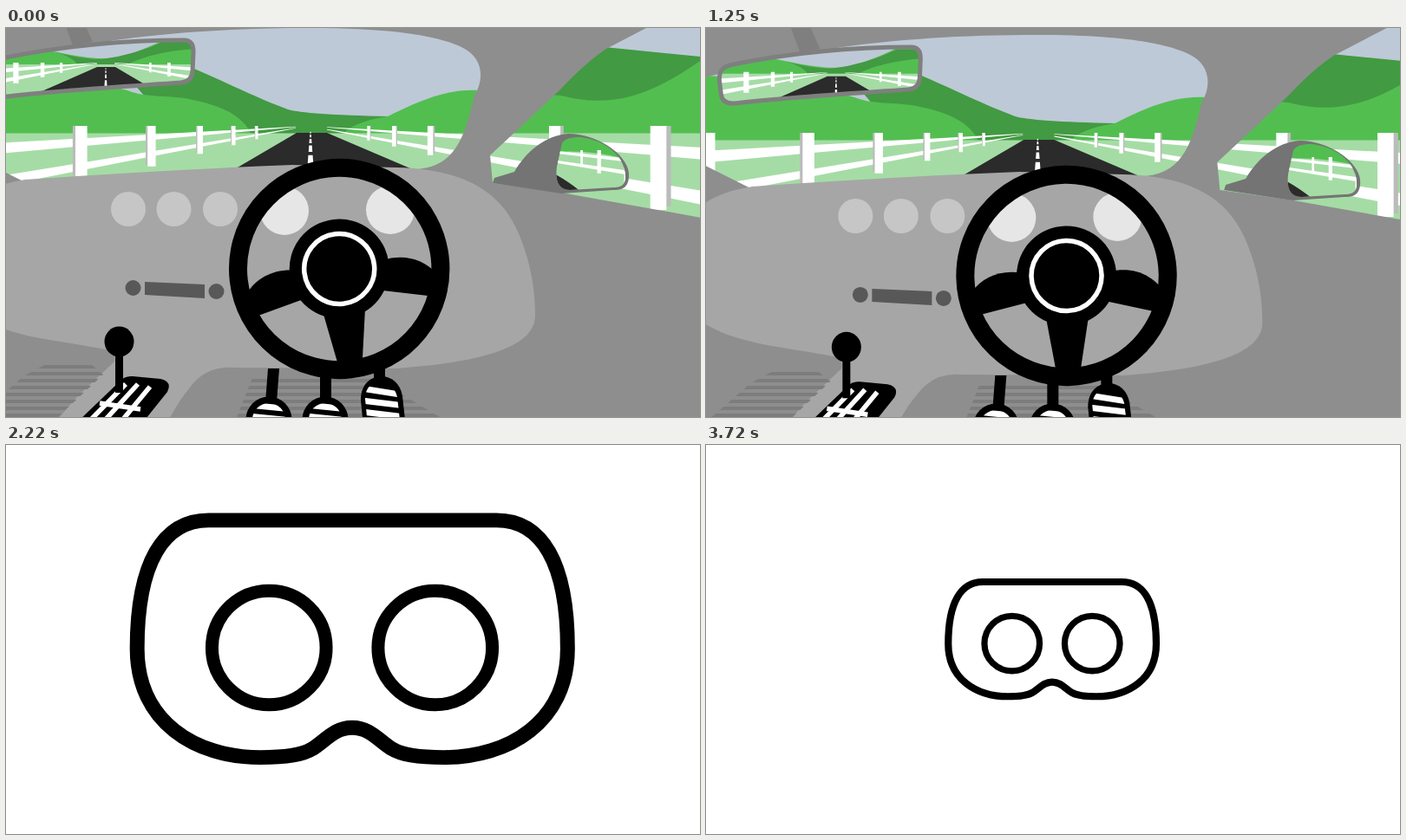
These frames come from a looping animation (800x449 px, 3770 ms). An HTML page:

```html
<!DOCTYPE html>
<html lang="en">
<head>
<meta charset="utf-8">
<title>Driving view to headset</title>
<style>
  html, body { margin: 0; height: 100%; overflow: hidden; background: #fff; }
  svg { display: block; width: 100vw; height: 100vh; }
  .sky { fill: #bdc9d6; }
  .dark { fill: #429a42; }
  .light { fill: #52be50; }
  .field { fill: #a5dca5; }
  .road { fill: #2b2b2b; }
  .white { fill: #fff; }
  .shade { fill: #bbb; }
  .cabin { fill: #8e8e8e; }
  .dash { fill: #a6a6a6; }
  .line { fill: none; stroke: #000; }
</style>
</head>
<body>
<svg viewBox="0 0 800 449" preserveAspectRatio="none">
  <defs>
    <pattern id="tread" width="8" height="8" patternUnits="userSpaceOnUse" y="5">
      <path d="M0 0H8V4H0Z" fill="#7d7d7d"/>
    </pattern>
    <path id="rearShape" d="M-16 52C-16 40-12 37 0 34C70 20 140 14 205 14Q216 14 216 27L215 50Q214 62 202 63C130 68 60 72 2 79Q-13 80-14 68Z"/>
    <path id="sideShape" d="M641 133C645 126 660 125 668 127C695 132 714 150 714 172C714 183 706 184 700 184L650 187C636 187 633 175 635 160Z"/>
    <clipPath id="rearClip"><use href="#rearShape"/></clipPath>
    <clipPath id="sideClip"><use href="#sideShape"/></clipPath>
    <clipPath id="padClip">
      <circle cx="303" cy="452" r="19"/>
      <circle cx="368" cy="452" r="19"/>
      <path d="M418 470L414 428C414 402 446 402 451 426L456 470Z"/>
    </clipPath>
  </defs>

  <g id="scene">
    <!-- landscape -->
    <path class="sky" d="M-100-60H850V130H-100Z"/>
    <path class="dark" d="M100 10C200 30 250 66 325 94Q345 100 440 102V125H200Z M580 60L690 22L800 33L840 37V125H600Z"/>
    <path class="light" d="M-100 45L60 50Q100 62 140 72C165 82 190 76 220 84C255 92 275 104 284 125H-100Z M385 125Q400 108 440 102C480 82 510 70 545 72L640 78C690 91 735 84 800 38L830 20V125Z"/>
    <path class="field" d="M-100 121.500H850V240H-100Z"/>
    <path class="road" d="M335 121H370L473 165H260Z"/>
    <path class="white" id="marks"/>
    <path class="white" id="rails"/>
    <path class="shade" id="shades"/>
    <path class="white" id="posts"/>

    <!-- cabin -->
    <path class="cabin" fill-rule="evenodd" d="M-100-60H900V500H-100Z
      M-90 62L111 16C200 3 280 0 350 0C450 0 500 10 525 22C550 34 552 58 540 78C530 120 520 160 474 163L22 178L-90 122Z
      M558 147Q600 108 640 70Q668 40 692 24L830-48V224L640 190L561 179Z"/>
    <path class="dash" d="M22 175Q180 164 330 158L450 161C530 163 570 190 590 235C606 272 610 305 610 332C610 365 560 385 450 393L262 392Q230 390 212 415Q195 435 182 465H50Q70 437 90 418L125 385Q127 375 115 371C60 360 10 358-30 335C-80 310-90 220-20 187Q0 178 22 175Z"/>
    <path fill="url(#tread)" d="M44 389H99L112 400L60 449H-34L20 402Z M285 401H420L500 449H266Z"/>

    <!-- rear mirror -->
    <path fill="#7f7f7f" d="M62-20H84L100 16L77 20Z"/>
    <g clip-path="url(#rearClip)"><g id="rearView">
      <path class="light" d="M-30-10H220V90H-30Z"/>
      <path class="sky" d="M45 25Q80 33 105 35H122Q150 30 190 10H40Z"/>
      <path class="dark" d="M55 27Q85 36 110 36Q150 31 185 14H220V24Q170 27 140 42H82Q78 34 55 27Z"/>
      <path class="field" d="M-30 42H220V90H-30Z"/>
      <path class="road" d="M105 45H126L165 68L30 78Z"/>
      <path class="white" id="rearMarks"/>
      <path class="white" id="rearRails"/>
      <path class="white" id="rearPosts"/>
    </g></g>
    <use href="#rearShape" fill="none" stroke="#7f7f7f" stroke-width="5"/>

    <!-- side mirror -->
    <g id="sideMirror">
      <path fill="#747474" d="M561 179L563 173L586 166C600 142 622 124 648 122C685 122 721 150 718 172C717 186 708 187 700 187L640 191Z"/>
      <g clip-path="url(#sideClip)">
        <path class="light" d="M630 120H720V150H630Z"/>
        <path class="dark" d="M665 120Q690 138 720 142V120Z"/>
        <path class="field" d="M630 143Q680 140 720 153V195H630Z"/>
        <path class="road" d="M630 167Q650 178 664 190H630Z"/>
        <path class="white" d="M636 142L720 151V155L636 145Z M636 153L720 165V170L636 156Z"/>
        <path class="white" id="sidePosts"/>
      </g>
    </g>

    <!-- dashboard -->
    <g fill="#c6c6c6"><circle cx="141" cy="209" r="20"/><circle cx="193.500" cy="209" r="20"/><circle cx="247" cy="209" r="20"/></g>
    <g fill="#e6e6e6"><circle cx="321" cy="211" r="28"/><circle cx="443" cy="210" r="28"/></g>
    <g fill="#585858">
      <circle cx="146.500" cy="300" r="9"/><circle cx="242.500" cy="304" r="9"/>
      <path d="M160 293L229 296V312L160 308Z"/>
    </g>

    <!-- gear lever -->
    <g id="gear">
      <path d="M80 457L131 408Q137 401 146 402L178 405Q192 408 186 420L154 460Z"/>
      <path fill="none" stroke="#fff" stroke-width="5.500" d="M138 411L94 456M152 411L111 456M166 414L128 460M108 433L155 440"/>
      <path d="M126 370H135V421H126Z"/>
      <ellipse cx="130.500" cy="362" rx="17" ry="17.500"/>
    </g>

    <!-- pedals -->
    <path d="M302 393H315L312 432H299Z M362 398H375V432H362Z M424 393H437V410H424Z"/>
    <circle cx="303" cy="452" r="26.500"/><circle cx="368" cy="452" r="26.500"/>
    <path d="M413 470L409 430C408 395 452 392 457 425L462 470Z"/>
    <path clip-path="url(#padClip)" fill="none" stroke="#fff" stroke-width="7" d="M280 435L330 440M280 448L330 453M345 435L395 440M345 448L395 453M410 416L460 424M410 430L460 436M410 443L460 449"/>

    <!-- steering wheel, centred on its hub -->
    <g id="wheel">
      <path id="spoke" d="M-50-4C-75-9-96-1-110 17L-104 44L-45 30Z"/>
      <use href="#spoke" transform="scale(-1 1)"/>
      <path d="M-25 45L-14 110H14L25 45Z"/>
      <circle class="line" r="116.700" stroke-width="21"/>
      <circle r="57.500"/>
      <circle r="40.500" fill="none" stroke="#fff" stroke-width="5.500"/>
    </g>
  </g>

  <g id="overlay">
    <path class="white" d="M0 0H800V449H0Z"/>
    <g id="headset" class="line">
      <path stroke-width="17" d="M233 86.500H566C618 86.500 648 135 648 235C648 320 580 361 505 361C480 361 456 358 445 351C430 342 420 326.500 399 326.500C378 326.500 368 342 353 351C342 358 318 361 293 361C218 361 150.500 320 150.500 235C150.500 135 181 86.500 233 86.500Z"/>
      <g stroke-width="15"><circle cx="303" cy="234" r="66"/><circle cx="495" cy="234" r="66"/></g>
    </g>
  </g>
</svg>
<script>
const LOOP = 3770;
const $ = id => document.getElementById(id);
const setPath = (id, d) => $(id).setAttribute('d', d);
const transform = (id, value) => $(id).setAttribute('transform', value);
const shift = (id, x, y) => transform(id, `translate(${x} ${y})`);
const clamp = v => Math.min(1, Math.max(0, v));
const poly = (...points) => 'M' + points.map(p => p.join(' ')).join('L') + 'Z';
const box = (x, y, w, h) => poly([x, y], [x + w, y], [x + w, y + h], [x, y + h]);
const all = (list, draw) => list.map(draw).join('');

// Travel along the road, in fence-post spacings
const travelKeys = [[0, 0], [510, 1], [1250, 2], [1940, 3.3], [2220, 3.8]];
function travelAt(t) {
  let i = 1;
  while (i < travelKeys.length - 1 && t > travelKeys[i][0]) i++;
  const [t0, a] = travelKeys[i - 1], [t1, b] = travelKeys[i];
  return a + (b - a) * (t - t0) / (t1 - t0);
}

// Rail as a wedge spreading from the vanishing point between two slopes
const rail = (x, y, side, near, far, top, bottom) => poly(
  [x + side * near, y + near * top], [x + side * far, y + far * top],
  [x + side * far, y + far * bottom], [x + side * near, y + near * bottom]);

// Distances of evenly spaced objects from the vanishing point
function spread(phase, base, ratio, from, to) {
  const part = phase - Math.floor(phase), list = [];
  for (let n = from; n <= to; n++) list.push(base * ratio ** (n + part));
  return list;
}

const post = (x, y, side, width, drop) => d =>
  box(x + side * d - width * d / 2, y, width * d, drop * d);

const marks = (x, y, base, half, phase) => all(spread(phase, base, 1.5, -1, 4), d => {
  const e = d * 1.33;
  return poly([x - half * d, y + d], [x + half * d, y + d], [x + half * e, y + e], [x - half * e, y + e]);
});

setPath('rails',
  rail(348, 113, -1, 14, 450, .055, .09) + rail(348, 113, -1, 14, 450, .163, .196) +
  rail(348, 113, 1, 22, 480, .055, .085) + rail(348, 113, 1, 22, 480, .165, .2));
setPath('rearRails',
  rail(115, 39.5, -1, 10, 140, .06, .1) + rail(115, 39.5, -1, 10, 140, .16, .2) +
  rail(115, 39.5, 1, 10, 110, .06, .1) + rail(115, 39.5, 1, 10, 110, .16, .2));

function render(t) {
  const pan = Math.max(0, t - 50), travel = travelAt(t);
  shift('scene', pan * .0261, pan * .00665);

  // Parallax inside the cabin
  shift('rearView', pan * .003, pan * .0024);
  shift('sideMirror', pan * .004, 0);
  shift('gear', 0, pan * -.0014);
  transform('wheel', `translate(384.2 278) rotate(${-6.6 * clamp(1 - t / 2100) ** 2})`);

  const left = spread(travel, 180, 1.45, -3, 2);
  const right = spread(travel, 141, 1.42, -2, 3);
  setPath('posts', all(left, post(348, 113, -1, .052, .26)) + all(right, post(348, 113, 1, .046, .24)));
  setPath('shades',
    all(left, d => box(348 - d * 1.038, 113, d * .03, d * .25)) +
    all(right, d => box(348 + d, 113, d * .036, d * .23)));
  setPath('marks', marks(351, 113, 10, .075, travel));

  const behind = spread(-travel, 73, 1.42, -2, 2);
  setPath('rearPosts', all(behind, post(115, 40, -1, .06, .23)) + all(behind, post(115, 40, 1, .05, .22)));
  setPath('rearMarks', marks(115, 40, 6, .055, -travel));
  setPath('sidePosts', all(spread(-travel, 21, 1.6, 0, 4), post(630, 141, 1, .08, .5)));

  const fade = clamp((t - 1860) / 335), s = (t - 2220) / 1000;
  const zoom = .475 + .427 * Math.exp(-2.75 * s) + .098 * Math.exp(-15.25 * s);
  $('overlay').setAttribute('opacity', fade);
  $('overlay').style.display = fade ? '' : 'none';
  transform('headset', `translate(399 224.5) scale(${zoom}) translate(-399 -224.5)`);
}

function tick() {
  render(performance.now() % LOOP);
  requestAnimationFrame(tick);
}
tick();
</script>
</body>
</html>
```
